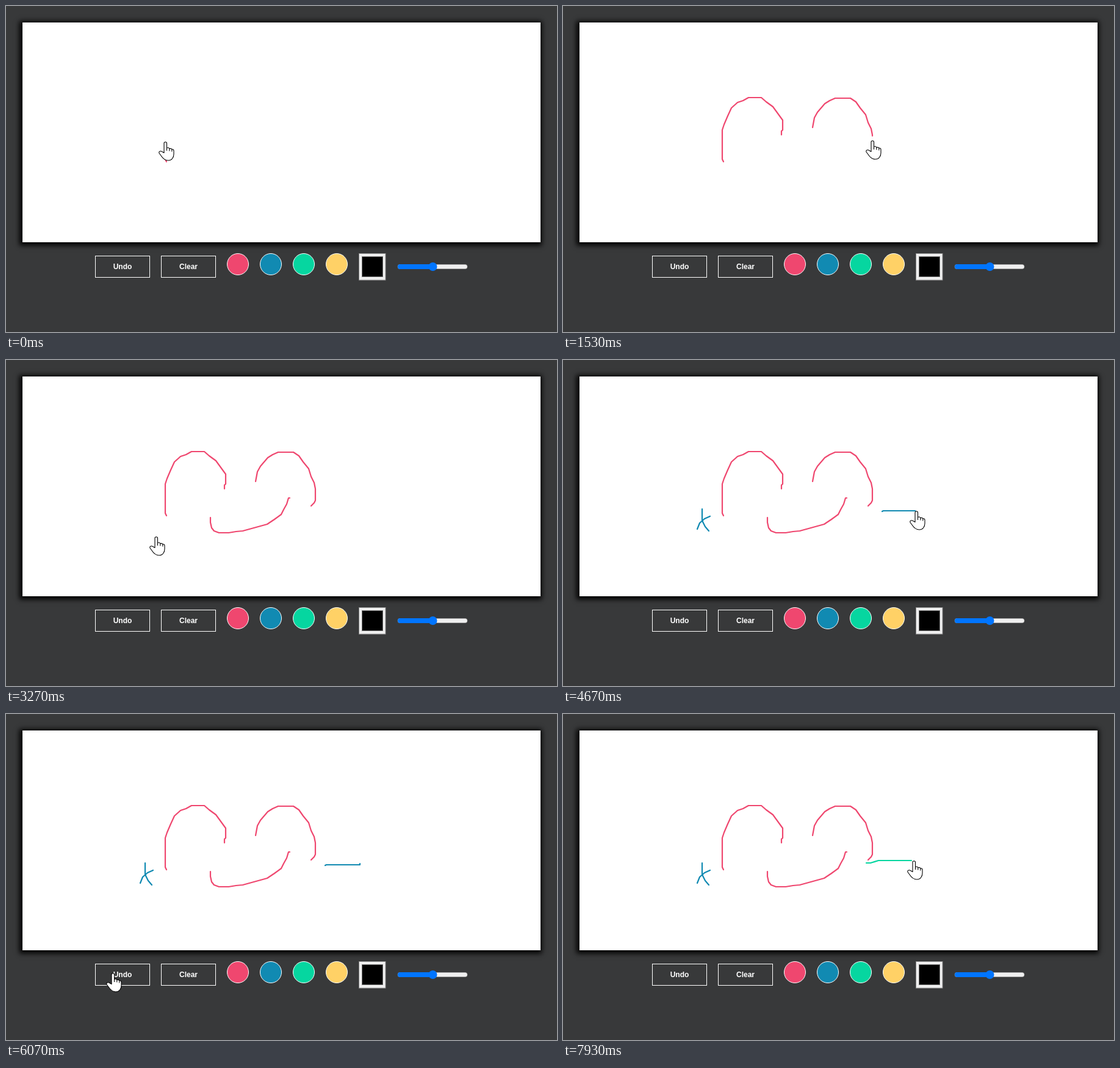
Recreate the animation shown at these times as an HTML page. Size 903 by 534 pixels, loop 8000 ms.

```html
<!DOCTYPE html>
<html lang="en">
<head>
<meta charset="utf-8">
<title>Drawing board</title>
<style>
  html, body { margin: 0; width: 100%; height: 100%; overflow: hidden; background: #38393a; }
  #board { position: absolute; left: 27px; top: 27px; width: 849px; height: 360px; background: #fff;
    box-shadow: -1.5px 1px 8px 3.5px #000; }
  svg { position: absolute; left: 0; top: 0; }
  text { font: bold 12px "Liberation Sans", Arial, sans-serif; fill: #fff; text-anchor: middle; }
  .line { fill: none; stroke: #fff; }
  #ink path { fill: none; stroke-width: 2.2; stroke-linecap: round; stroke-linejoin: round; }
  #hand, #arrow { fill: #fff; stroke: #000; stroke-width: 1.1; stroke-linejoin: round; }
</style>
</head>
<body>
<div id="board"></div>
<svg width="903" height="534" viewBox="0 0 903 534">
  <rect class="line" x="146.5" y="409.5" width="89" height="35"/>
  <rect class="line" x="254.5" y="409.5" width="89" height="35"/>
  <text x="191" y="431">Undo</text>
  <text x="299" y="431">Clear</text>
  <g stroke="#fff">
    <circle cx="380" cy="423" r="17.5" fill="#ef476f"/>
    <circle cx="434" cy="423" r="17.5" fill="#118ab2"/>
    <circle cx="488" cy="423" r="17.5" fill="#06d6a0"/>
    <circle cx="542" cy="423" r="17.5" fill="#ffd166"/>
  </g>
  <rect x="578.5" y="405.5" width="43.5" height="43.5" fill="#efefef" stroke="#8a8a8a"/>
  <rect x="583.5" y="410.5" width="34" height="33" stroke="#777"/>
  <rect x="642" y="423.5" width="114" height="7" rx="3.5" fill="#efefef" stroke="#b2b2b2" stroke-width=".6"/>
  <rect x="642" y="423" width="60" height="8" rx="4" fill="#0075ff"/>
  <circle cx="699.5" cy="427" r="7" fill="#0075ff"/>
  <g id="ink"></g>
  <g id="cursor">
    <path id="hand" d="M-2.5 18V2.5a2.2 2.2 0 0 1 4.5 0V10q3-1.5 4.3 1.2q3-1 4 1.2q3.2-.6 3.2 2.6V20
      C13.5 26 10 30.500 4.500 30.500C-2 30.500-5 26.500-7.500 22.500L-10.500 18.500C-11.500 15.500-8 14.500-6 16Z
      M2 10V14.500M6.300 11.200V15M10.300 12.400V16"/>
    <path id="arrow" d="M0 0V24L5.500 19L9.500 26.500L13 25L9.500 17.500H17Z"/>
  </g>
</svg>
<script>
const LOOP = 8000, STEP = 200 / 3;
const PINK = '#ef476f', BLUE = '#118ab2', GREEN = '#06d6a0';
const $ = id => document.getElementById(id);

// Pointer moves: start, end, path, then for strokes: colour, ink lag, undo time
const moves = [
  [-79, 452, 'M263 255L261 251V203L264 194L270 180L276 167L286 158L295 155L304 150H325L333 157L344 165L352 176L360 187V203L358 205V211', PINK, 67],
  [452, 870, 'M358 211C390 220 415 310 400 320S370 322 368 322'],
  [870, 1090, 'M368 322L409 199'],
  [1090, 1588, 'M409 199L412 183L417 174L429 160L437 155L446 151H471L480 157L487 167L496 178L500 191L505 201L507 211V230L505 234L500 239', PINK, 20],
  [1588, 1760, 'M500 239Q470 337 440 337'],
  [1760, 1900, 'M440 337L335 258'],
  [1900, 2400, 'M335 258V266L337 275L341 280L349 283H365L377 281L388 280L428 269L440 261L451 253L455 245L460 236L463 226H465', PINK, 20],
  [2400, 2600, 'M465 226L438 390'],
  [2600, 2930, 'M438 390Q428 400 432 421'],
  [3010, 3270, 'M432 421L244 287'],
  [3270, 3400, 'M244 287L228 244'],
  [3400, 3520, 'M228 244V262L229 265', BLUE, 20],
  [3520, 3600, 'M229 265L241 256'],
  [3600, 3720, 'M241 256L232 260L224 267L220 277', BLUE, 20],
  [3720, 3800, 'M220 277L229 265'],
  [3940, 4130, 'M229 265L233 273L239 280', BLUE, 20],
  [4130, 4420, 'M239 280L523 248'],
  [4420, 4680, 'M523 248L525 247H580V245', BLUE, 7, 6320],
  [4680, 4860, 'M580 245L552 226V234'],
  [4860, 5130, 'M552 234L548 246L547 256L544 268L540 280L536 290L530 300L526 311', BLUE, 20, 5990],
  [5130, 5400, 'M526 311L292 467'],
  [5400, 5665, 'M292 467L189 421'],
  [5665, 5730, 'M189 421L170 424'],
  [5950, 6130, 'M170 424H177'],
  [6280, 6730, 'M177 424Q300 442 456 433'],
  [6730, 6930, 'M456 433L493 424'],
  [7100, 7730, 'M493 424Q560 334 498 244'],
  [7800, 7950, 'M497 244H504L517 240H585', GREEN, 7]
].map(([start, end, d, colour, lag, undone = LOOP]) => {
  const path = document.createElementNS('http://www.w3.org/2000/svg', 'path');
  path.setAttribute('d', d);
  if (colour) {
    path.setAttribute('stroke', colour);
    $('ink').append(path);
  }
  const total = path.getTotalLength();
  const reach = t => total * Math.min(1, Math.max(0, (t - start) / (end - start)));
  return { path, start, colour, lag, undone, reach };
});

function isClickable(x, y) {
  const inBox = (l, t, r, b) => x >= l && x < r && y >= t && y < b;
  return inBox(27, 27, 876, 387) || inBox(146, 409, 236, 445) || inBox(254, 409, 344, 445) ||
    [380, 434, 488, 542].some(cx => Math.hypot(x - cx, y - 423) < 18);
}

function draw(t) {
  let current = moves[0];
  for (const move of moves) {
    if (move.start <= t) current = move;
    if (!move.colour) continue;
    const drawn = move.reach(t - move.lag);
    move.path.style.display = drawn > 0 && t < move.undone ? '' : 'none';
    move.path.style.strokeDasharray = `${drawn} 999`;
  }
  const tip = current.path.getPointAtLength(current.reach(t));
  const x = Math.round(tip.x), y = Math.round(tip.y);
  const pointing = isClickable(x, y);
  $('cursor').setAttribute('transform', `translate(${x + .5} ${y + .5})`);
  $('hand').style.display = pointing ? '' : 'none';
  $('arrow').style.display = pointing ? 'none' : '';
}

function tick() {
  const t = performance.now() % LOOP;
  draw(Math.floor(t / STEP + .1) * STEP % LOOP);
  requestAnimationFrame(tick);
}
tick();
</script>
</body>
</html>
```
